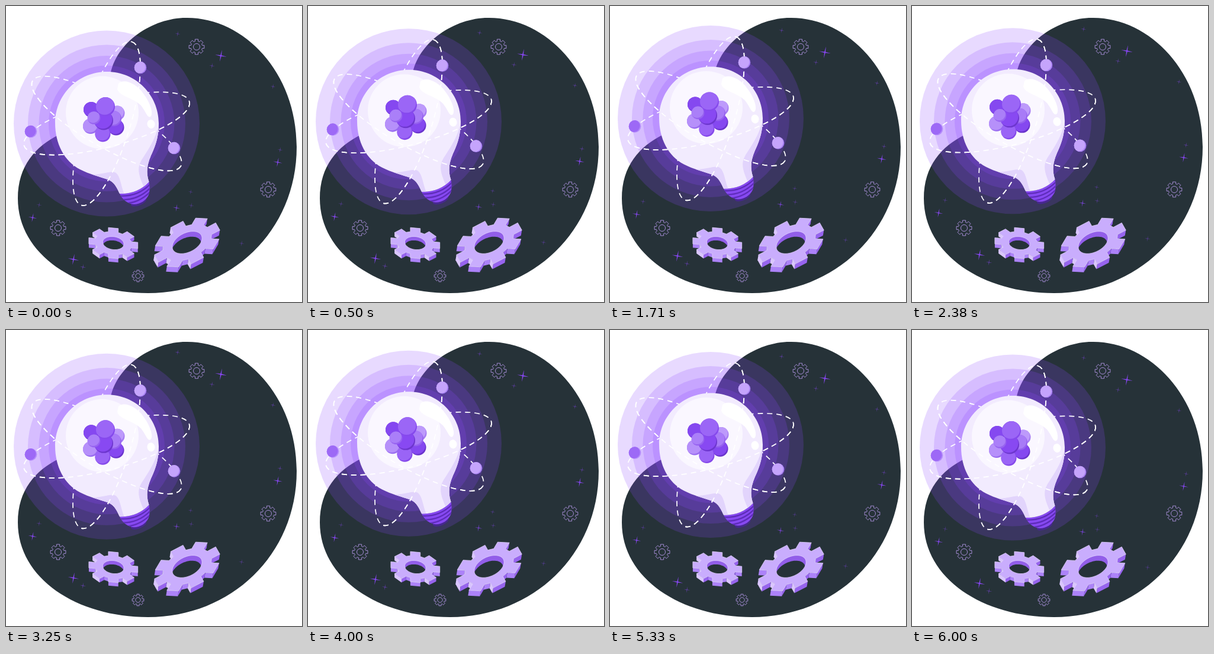
An HTML page with a canvas for the animation above (6040 ms loop, 500 by 500 pixels).

```html
<!DOCTYPE html>
<html lang="en">
<head>
<meta charset="utf-8">
<title>Idea bulb</title>
<style>
html, body { margin: 0; width: 100%; height: 100%; overflow: hidden; background: #fff; }
canvas { display: block; width: 500px; height: 500px; }
</style>
</head>
<body>
<canvas id="stage"></canvas>
<script>
const canvas = document.getElementById('stage');
const ctx = canvas.getContext('2d');
const dpr = window.devicePixelRatio || 1;
canvas.width = canvas.height = 500 * dpr;

const LOOP = 6040;
const TAU = Math.PI * 2;
const LILAC = '#c4a2fc';

const blob = new Path2D('M306 20C402 20 491 112 491 238C491 380 380 485 240 485C120 485 20 420 20 325C20 270 50 237 90 217C130 195 170 165 176 118C185 60 250 19 306 20Z');
const glass = new Path2D('M170.5 111C219 111 258 150 258 198C258 226 250 241 244 255C239 267 236 281 241.5 297Q222 318 192 317C188 309 184 298 173 293.5C160 289 140 284 125 276C98 262 83 232 83 198C83 150 122 111 170.5 111Z');
const neckShade = new Path2D('M138 284C160 287 178 276 186 282C194 289 194 306 201 320L182 322Z');
const sideShade = new Path2D('M260 190C255 225 238 245 228 262C220 276 226 290 233 306L262 297Z');
const shine = new Path2D('M190 131C198 122 220 130 232 148C243 162 250 182 244 187C239 190 236 178 228 168C215 155 190 152 188 140Z');
const screw = new Path2D('M192 317Q222 318 241.5 297C243 305 243 313 241 319C237 328 227 335 216 335C206 334 197 328 192 317Z');

// angle of each orbit in degrees
const orbits = [-14.8, 30, -72.8];

// x, y, radius, opacity
const sparkles = [
  [363, 84, 10, 1], [114, 428, 9.5, 1], [459, 264, 8, 1], [45, 357.5, 7.5, 1], [288, 341, 6.5, .8],
  [290, 47, 4.8, .6], [348, 101, 5, .6], [451, 136, 4.5, .6], [463, 243, 4.8, .6], [312, 314, 4.5, .5],
  [313, 337, 5, .5], [398, 401, 5, .5], [56, 336, 5, .5], [130, 441, 5.5, .6]
];

// x, y, radius, light, dark
const nucleus = [
  [188, 181, 12.5, '#bd9afb', '#a67cf2'],
  [144, 175, 13, '#8548f0', '#7038d6'],
  [143, 203, 13, '#b690fa', '#9a6df0'],
  [186, 205, 13.5, '#8548f0', '#6a34cc'],
  [163.5, 216.5, 13, '#9a64f6', '#8549ea'],
  [182, 190, 13, '#a87bf7', '#9561ee'],
  [165, 193.5, 16, '#8849f2', '#6d36ce'],
  [148.5, 189, 10.8, '#aa7ff8', '#9763f0'],
  [168, 170, 16, '#9b66f6', '#8549ec']
];

const balls = [
  [227, 104, 10.3, '#c5a4fc', '#a981f4'],
  [284, 240, 10.3, '#c5a4fc', '#a981f4'],
  [42, 212, 10.3, '#9d69f6', '#b48cfb']
];

const fill = (path, color) => { ctx.fillStyle = color; ctx.fill(path); };

function disc(x, y, r, color) {
  ctx.beginPath();
  ctx.arc(x, y, r, 0, TAU);
  ctx.fillStyle = color;
  ctx.fill();
}

function sphere([x, y, r, light, dark], dx = -1.5, dy = -2.3) {
  disc(x, y, r, dark);
  ctx.save();
  ctx.clip();
  disc(x + dx, y + dy, r, light);
  ctx.restore();
}

function poly(points) {
  ctx.beginPath();
  for (const [x, y] of points) ctx.lineTo(x, y);
  ctx.closePath();
}

// Point at angle a and radius r in the plane spanned by u and w
function spot(c, u, w, a, r) {
  const p = r * Math.cos(a), q = r * Math.sin(a);
  return [c[0] + p * u[0] + q * w[0], c[1] + p * u[1] + q * w[1]];
}

function teeth(c, u, w, root = .77, tip = 1.04) {
  const out = [];
  for (let i = 0; i < 8; i++) {
    for (const [da, r] of [[-.27, root], [-.2, tip], [.2, tip], [.27, root]]) {
      out.push(spot(c, u, w, i * TAU / 8 + da, r));
    }
  }
  return out;
}

function ring(c, u, w, r) {
  return Array.from({ length: 60 }, (_, i) => spot(c, u, w, i * TAU / 60, r));
}

function solidGear(c, u, w, d, bore) {
  const face = teeth(c, u, w);
  const hole = ring(c, u, w, bore);
  const shift = ([x, y]) => [x + d[0], y + d[1]];
  const walls = face.map((p, i) => [p, face[(i + 1) % face.length]]);
  walls.sort((a, b) => a[0][1] + a[1][1] - b[0][1] - b[1][1]);
  for (const [p, q] of walls) {
    // outward normal of a counter-clockwise edge
    const nx = p[1] - q[1], ny = q[0] - p[0];
    if (nx * d[0] + ny * d[1] <= 0) continue;
    poly([p, q, shift(q), shift(p)]);
    const side = nx / Math.hypot(nx, ny);
    ctx.fillStyle = side > .25 ? '#9764ee' : side < -.35 ? '#dac6fe' : '#ac82f8';
    ctx.fill();
  }
  poly(face);
  ctx.fillStyle = '#c9adfd';
  ctx.fill();
  ctx.strokeStyle = '#e2d3ff';
  ctx.lineWidth = .8;
  ctx.stroke();
  ctx.save();
  poly(hole);
  ctx.fillStyle = '#925ee9';
  ctx.fill();
  ctx.clip();
  poly(hole.map(shift));
  ctx.fillStyle = '#263238';
  ctx.fill();
  ctx.restore();
  poly(hole);
  ctx.stroke();
}

function lineGear(x, y, r) {
  ctx.strokeStyle = LILAC;
  ctx.lineWidth = .8;
  poly(teeth([x, y], [r, 0], [0, -r], .75, 1));
  ctx.stroke();
  ctx.beginPath();
  ctx.arc(x, y, r * .42, 0, TAU);
  ctx.stroke();
}

function sparkle(x, y, r, alpha) {
  ctx.save();
  ctx.translate(x, y);
  ctx.rotate(.18);
  ctx.globalAlpha = alpha;
  ctx.beginPath();
  for (let i = 0; i < 8; i++) {
    const a = i * TAU / 8, k = i % 2 ? r * .13 : r;
    ctx.lineTo(k * Math.sin(a), -k * Math.cos(a));
  }
  ctx.fillStyle = '#8847f2';
  ctx.fill();
  ctx.restore();
}

function orbit(deg, end) {
  ctx.beginPath();
  ctx.ellipse(170, 198.5, 144.5, 39.5, deg * Math.PI / 180, 0, end);
  ctx.setLineDash([9, 7]);
  ctx.strokeStyle = '#fff';
  ctx.lineWidth = 1.7;
  ctx.stroke();
  ctx.setLineDash([]);
}

function drawScrew() {
  ctx.save();
  ctx.beginPath();
  ctx.ellipse(224, 331, 14, 6, -.38, 0, TAU);
  ctx.fillStyle = '#47288f';
  ctx.fill();
  fill(screw, '#8749f1');
  ctx.clip(screw);
  ctx.strokeStyle = '#5e2cba';
  ctx.lineWidth = 2.4;
  for (let i = 0; i < 3; i++) {
    const y = 4.5 + i * 6.5;
    ctx.beginPath();
    ctx.moveTo(189, 316 + y);
    ctx.quadraticCurveTo(222, 319 + y, 244, 296 + y);
    ctx.stroke();
  }
  ctx.restore();
}

function drawBulb() {
  for (const r of [157, 133, 114.5, 98]) disc(170, 198.5, r, 'rgba(140,71,255,.2)');
  for (const deg of orbits) orbit(deg, TAU);
  drawScrew();
  fill(glass, '#f2ebfe');
  ctx.save();
  ctx.clip(glass);
  fill(neckShade, '#e2d4fc');
  fill(sideShade, '#e2d4fc');
  disc(162.5, 180, 61.5, '#faf7ff');
  ctx.restore();
  fill(shine, '#fff');
  ctx.beginPath();
  ctx.ellipse(245, 199.5, 6.5, 7.5, -.2, 0, TAU);
  ctx.fill();
  for (const s of nucleus) sphere(s);
  for (const deg of orbits) orbit(deg, Math.PI);
  for (const b of balls) sphere(b, -1.8, -.8);
}

// Linear rise of 10 px and back
const float = (t, period) => -10 * (1 - Math.abs(1 - 2 * (t % period) / period));

function draw(t) {
  ctx.setTransform(dpr, 0, 0, dpr, 0, 0);
  ctx.fillStyle = '#fff';
  ctx.fillRect(0, 0, 500, 500);
  fill(blob, '#263238');

  lineGear(322, 69, 13.1);
  lineGear(443, 310, 13.1);
  lineGear(88, 375, 13.2);
  lineGear(223, 456, 10);

  const rise = float(t, 6000);
  for (const [x, y, r, a] of sparkles) sparkle(x, y + rise, r, a);

  solidGear([181.3, 400.5], [40.6, 3.8], [0, -25], [0, 6.5], .44);
  solidGear([306, 399.5], [48, 2.5], [23.8, -40], [-1.5, 9], .47);

  ctx.save();
  ctx.translate(0, float(t, 3000));
  drawBulb();
  ctx.restore();
}

const start = performance.now();
function tick() {
  draw((performance.now() - start) % LOOP);
  requestAnimationFrame(tick);
}
tick();
</script>
</body>
</html>
```
